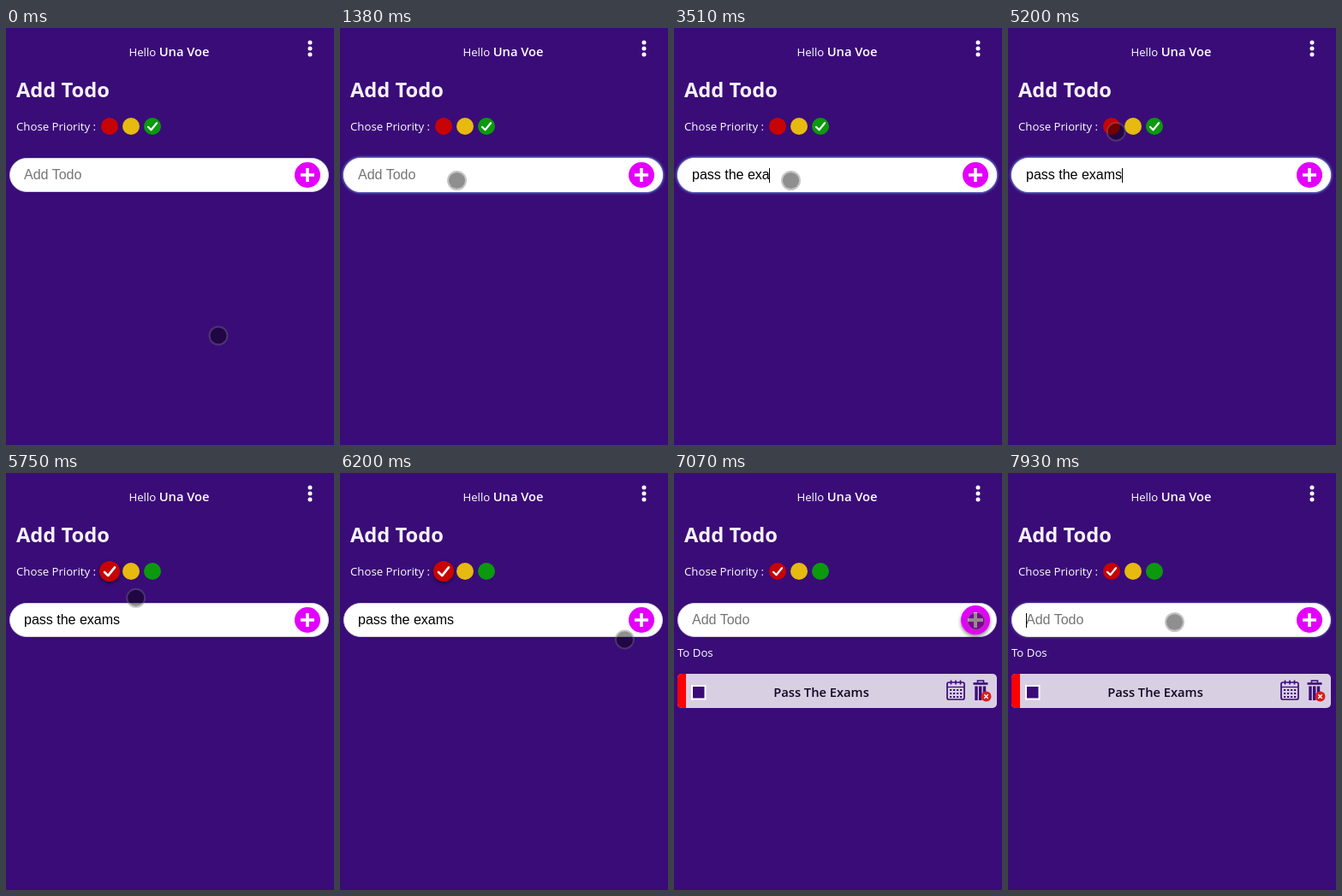
An HTML page that plays this animation: 383x488 px, repeating every 8000 ms.

```html
<!DOCTYPE html>
<html lang="en">
<head>
<meta charset="utf-8">
<title>Todo list</title>
<style>
html, body { margin: 0; height: 100%; overflow: hidden; background: #3a0c78; }
svg { display: block; }
text { font-family: "Open Sans", "Noto Sans", sans-serif; font-size: 13.2px; fill: #fff; white-space: pre; }
.semi { font-weight: 600; font-size: 14.7px; }
.title { font-weight: 700; font-size: 23.7px; fill: #f5f1fa; }
.field { font: 16px "Liberation Sans", Arial, sans-serif; }
.tick { fill: none; stroke: #fff; stroke-width: 2.2; stroke-linecap: round; stroke-linejoin: round; }
</style>
</head>
<body>
<svg width="383" height="488" viewBox="0 0 383 488">
  <defs>
    <filter id="blur" x="-20%" y="-50%" width="140%" height="200%"><feGaussianBlur stdDeviation="1.8"/></filter>
    <path id="check" class="tick" d="M-5 .8L-1.5 4.3L5 -3.8"/>
  </defs>

  <text x="190.5" y="33" text-anchor="middle">Hello <tspan class="semi">Una Voe</tspan></text>
  <path d="M355 17V32" stroke="#fff" stroke-width="5" stroke-linecap="round" stroke-dasharray="0 7"/>
  <text class="title" x="12" y="81">Add Todo</text>
  <text x="12" y="120">Chose Priority :</text>

  <g id="red">
    <circle id="redShade" cy="1.5" r="10" filter="url(#blur)" opacity="0"/>
    <circle r="10" fill="#c80303"/><use id="redCheck" href="#check"/>
  </g>
  <circle cx="146" cy="115" r="10" fill="#e6ba0f"/>
  <g transform="translate(171 115)"><circle r="10" fill="#0b990e"/><use id="greenCheck" href="#check"/></g>

  <rect id="glow" x="3.5" y="151.5" width="374" height="41" rx="20.5" fill="#80bdff" filter="url(#blur)"/>
  <rect x="4.5" y="152.5" width="372" height="39" rx="19.5" fill="#fff" stroke="#ced4da"/>
  <rect id="edge" x="4.5" y="152.5" width="372" height="39" rx="19.5" fill="none" stroke="#fff"/>
  <text id="entry" class="field" x="21" y="177"></text>
  <rect id="caret" y="164" width="1" height="17"/>

  <g id="plus">
    <circle id="plusShade" cy="2" r="15" filter="url(#blur)" opacity="0"/>
    <circle r="15" fill="#e300fb"/>
    <path d="M-8 0H8M0 -8V8" stroke="#fff" stroke-width="3.6"/>
  </g>

  <g id="todo">
    <text x="4" y="215">To Dos</text>
    <rect x="4" y="235" width="373" height="40" rx="5" fill="#d9cfe3"/>
    <path d="M14 235H9a5 5 0 0 0-5 5v30a5 5 0 0 0 5 5h5z" fill="#f00"/>
    <rect x="21" y="249" width="15.5" height="15.5" fill="#3a0c78" stroke="#fff" stroke-width="2"/>
    <text class="semi" x="172" y="262" text-anchor="middle" style="fill:#10051f">Pass The Exams</text>
    <g fill="none" stroke="#3a0c78">
      <rect x="319" y="245" width="20" height="20" rx="2" stroke-width="1.7"/>
      <path d="M319 250.5H339" stroke-width="1.3"/>
      <path d="M323.5 242.5v5M329 242.5v5M334.5 242.5v5" stroke-width="1.6"/>
      <path d="M322 254H337M322 258H337M322 262H337" stroke-width="2" stroke-dasharray="2.2 1.8"/>
      <path d="M349.5 246.5H366.5" stroke-width="2.6"/>
      <path d="M354.5 245.5V243H361.5V245.5" stroke-width="1.6"/>
      <path d="M353 249.5V266M357.7 249.5V266M362.5 249.5V258" stroke-width="3.4"/>
    </g>
    <circle cx="364.5" cy="261.5" r="6" fill="#d9201f"/>
    <path d="M362.3 259.3l4.4 4.4m0-4.4l-4.4 4.4" stroke="#fff" stroke-width="1.4"/>
  </g>

  <g id="pointer">
    <circle r="9.6" fill-opacity=".44"/>
    <circle r="10.5" fill="none" stroke="#6e6e6e" stroke-opacity=".4" stroke-width="2"/>
  </g>
</svg>
<script>
const LOOP = 8000, TICK = 77.5, BLINK = 460, PHRASE = "pass the exams";
const CLICK = 910, PICK = 5580, ADD = 6920, REFOCUS = 7840;

// pointer moves: start time, end time, bend, destination
const START = [248, 360];
const moves = [
  [70, 130, [190, 240], [146, 183]],
  [290, 440, [140, 181], [136.5, 178.5]],
  [4890, 5430, [127, 108], [121, 115]],
  [PICK, 6370, [278, 285], [351, 172]],
  [6450, 6600, [353, 171], [354, 173]],
  [ADD, 7630, [340, 178], [194.5, 174.5]]
];

// typing bursts: first key, interval, letters
const bursts = [[1930, 157, 4], [2570, 75, 5], [3040, 233, 5]];
const keys = bursts.flatMap(([t, gap, n]) => Array.from({ length: n }, (_, i) => t + gap * i));

const $ = id => document.getElementById(id);
const set = (id, name, value) => $(id).setAttribute(name, value);
const show = (id, on) => { $(id).style.display = on ? "" : "none"; };
const ramp = (t, a, b) => Math.min(1, Math.max(0, (t - a) / (b - a)));
const ease = u => u * u * (3 - 2 * u);

function pointerAt(t) {
  let pos = START;
  for (const [from, to, bend, end] of moves) {
    if (t < from) break;
    const stepped = from + Math.floor((t - from) / TICK) * TICK;
    const u = ease(t >= to ? 1 : ramp(stepped, from, to)), v = 1 - u;
    pos = pos.map((p, i) => v * v * p + 2 * u * v * bend[i] + u * u * end[i]);
  }
  return pos;
}

function hover(id, x, y, amount, growth) {
  set(id, "transform", `translate(${x} ${y}) scale(${1 + growth * amount})`);
  set(id + "Shade", "opacity", .5 * amount);
}

function draw(t) {
  const chosen = t >= PICK, added = t >= ADD;
  show("redCheck", chosen);
  show("greenCheck", !chosen);
  show("todo", added);
  hover("red", 121, 115, added ? 0 : ramp(t, 5200, 5400), .2);
  hover("plus", 352, 172, ramp(t, 6270, 6370) - ramp(t, 7240, 7400), .13);

  const focus = ramp(t, CLICK - 50, 1070) - ramp(t, PICK - 50, 5740) + ramp(t, REFOCUS, 8140);
  set("glow", "opacity", focus);
  set("edge", "opacity", focus);

  const typed = added ? [] : keys.filter(k => k <= t);
  const entry = $("entry");
  entry.textContent = PHRASE.slice(0, typed.length) || "Add Todo";
  entry.style.fill = typed.length ? "#000" : "#757575";

  // the caret restarts its blink at every click and key
  const focused = t >= CLICK && t < PICK || t >= REFOCUS;
  const last = added ? REFOCUS : Math.max(CLICK, ...typed);
  set("caret", "x", typed.length ? Math.floor(21 + entry.getComputedTextLength()) : 21);
  show("caret", focused && (t - last) % (2 * BLINK) < BLINK);

  set("pointer", "transform", `translate(${pointerAt(t)})`);
}

function frame() {
  draw(performance.now() % LOOP);
  requestAnimationFrame(frame);
}
frame();
</script>
</body>
</html>
```
